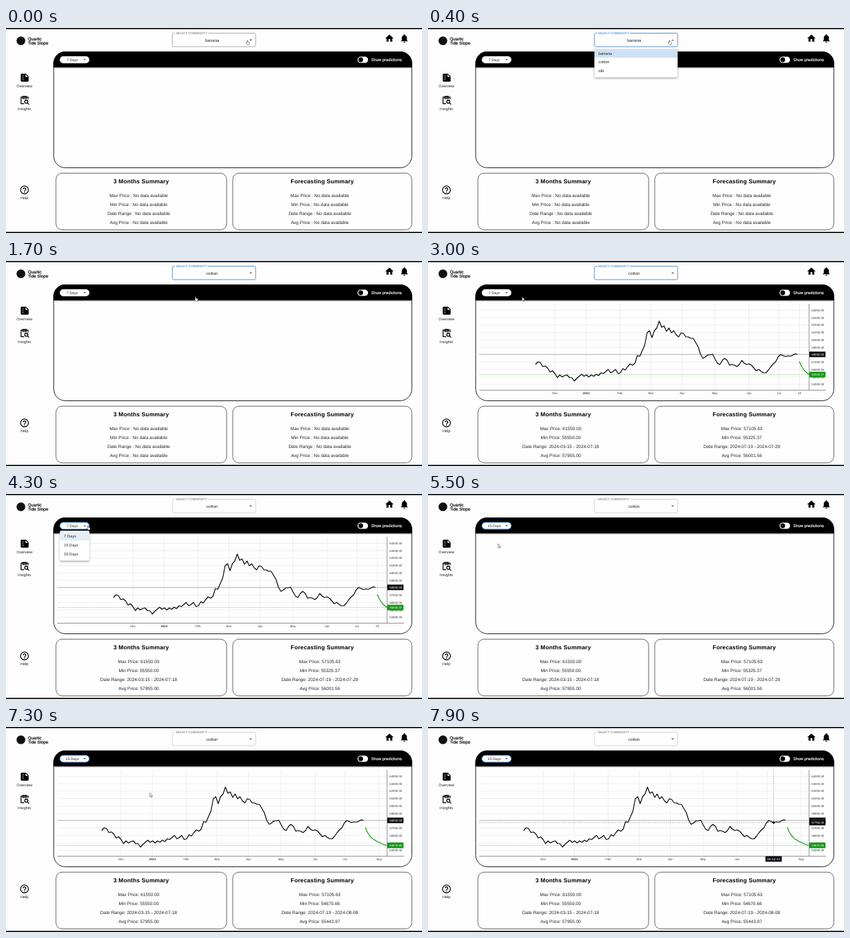
These frames come from a looping animation (600x297 px, 8 s). An HTML page:

```html
<!DOCTYPE html>
<html lang="en">
<head>
<meta charset="utf-8">
<title>Price dashboard</title>
<style>
html, body { margin: 0; width: 100%; height: 100%; overflow: hidden; background: #fefdfe; }
svg { display: block; width: 600px; height: 297px; }
text { font-family: "Liberation Sans", Arial, sans-serif; text-rendering: geometricPrecision; white-space: pre; }
</style>
</head>
<body>
<svg id="stage" viewBox="0 0 600 297" xmlns="http://www.w3.org/2000/svg">
  <defs>
    <linearGradient id="shade" x1="0" y1="0" x2="0" y2="1">
      <stop offset="0" stop-color="#000" stop-opacity=".4"/>
      <stop offset="1" stop-color="#000" stop-opacity="0"/>
    </linearGradient>
    <filter id="drop" x="-20%" y="-20%" width="140%" height="150%">
      <feDropShadow dx="0" dy="1.5" stdDeviation="1.6" flood-color="#000" flood-opacity=".4"/>
    </filter>
  </defs>
</svg>
<script>
const LOOP = 8000;
const stage = document.getElementById('stage');

function el(tag, attrs = {}, parent = stage, text) {
  const node = document.createElementNS('http://www.w3.org/2000/svg', tag);
  set(node, attrs);
  if (text !== undefined) node.textContent = text;
  parent.appendChild(node);
  return node;
}
function set(node, attrs) {
  for (const k in attrs) node.setAttribute(k, attrs[k]);
}
const group = (parent = stage, attrs = {}) => el('g', attrs, parent);
// y is the middle of the capitals
const label = (text, x, y, size, attrs = {}, parent = stage) =>
  el('text', { x, y: y + size * 0.36, 'font-size': size, fill: '#222', ...attrs }, parent, text);
const box = (x, y, width, height, attrs = {}, parent = stage) =>
  el('rect', { x, y, width, height, ...attrs }, parent);
const line = (x1, y1, x2, y2, stroke, attrs = {}, parent = stage) =>
  el('line', { x1, y1, x2, y2, stroke, 'stroke-width': 0.7, ...attrs }, parent);
const path = (d, attrs = {}, parent = stage) => el('path', { d, ...attrs }, parent);
const show = (node, on) => node.setAttribute('visibility', on ? 'visible' : 'hidden');
const MID = { 'text-anchor': 'middle' };

// Page frame and brand
box(0, 0, 600, 1.6);
box(0, 295.4, 600, 1.6);
el('circle', { cx: 21.5, cy: 18.5, r: 6.3, fill: '#111' });
const brand = { fill: '#111', stroke: '#111', 'stroke-width': 0.2 };
label('Quartic', 31.5, 15.3, 6.2, brand);
label('Tide Slope', 31.5, 21.9, 6.2, brand);

// Icons on a 24 unit grid
const icon = (x, y, s) => group(stage, { transform: `translate(${x} ${y}) scale(${s})` });
path('M10 20v-6h4v6h5v-8h3L12 3 2 12h3v8z', {}, icon(545.8, 7.7, 0.6));
path('M12 22c1.1 0 2-.9 2-2h-4c0 1.1.9 2 2 2zm6-6v-5c0-3.1-1.6-5.6-4.5-6.3V4a1.5 1.5 0 0 0-3 0v.7C7.6 5.4 6 7.9 6 11v5l-2 2v1h16v-1z',
  {}, icon(567.1, 7.5, 0.62));
const doc = icon(19.4, 64.4, 0.63);
path('M15 3H5a2 2 0 0 0-2 2v14a2 2 0 0 0 2 2h14a2 2 0 0 0 2-2V9z', {}, doc);
path('M14 4.5V10h5.5z', { fill: '#fff' }, doc);
[8, 12, 16].forEach(cy => el('circle', { cx: 8, cy, r: 1, fill: '#fff' }, doc));
const clip = icon(19.2, 97, 0.63);
path('M11 20H4V5h16v5M8 3.5h8V8H8z', { fill: 'none', stroke: '#000', 'stroke-width': 2 }, clip);
el('circle', { cx: 16, cy: 15.5, r: 3.6, fill: 'none', stroke: '#000', 'stroke-width': 2 }, clip);
path('M18.5 18l4 4', { stroke: '#000', 'stroke-width': 2 }, clip);
const help = icon(19.1, 227.1, 0.63);
el('circle', { cx: 12, cy: 12, r: 9, fill: 'none', stroke: '#000', 'stroke-width': 2 }, help);
path('M11 18h2v-2h-2zM12 6a4 4 0 0 0-4 4h2a2 2 0 0 1 4 0c0 2-3 1.75-3 5h2c0-2.25 3-2.5 3-5a4 4 0 0 0-4-4z', {}, help);
[['Overview', 84.2], ['Insights', 116.8], ['Help', 246.2]].forEach(([s, y]) => label(s, 26.6, y, 5.5, MID));

// Commodity select
const field = box(240, 7.5, 120, 19.5, { rx: 1.5, fill: 'none' });
box(243.5, 5.5, 48, 4, { fill: '#fefdfe' });
const fieldName = label('SELECT COMMODITY', 245, 7.3, 4.35);
const fieldValue = label('', 297.3, 17.5, 6, MID);
const fieldArrow = path('M-2-1h4L0 1.1z', { fill: '#666' });

// Chart card
box(68.8, 34.5, 516.5, 168, { rx: 17, fill: '#fefefe', stroke: '#222', 'stroke-width': 1 });
path('M68.4 57V51a17 17 0 0 1 17-17H568.7a17 17 0 0 1 17 17V57z');
box(69.3, 57, 515.6, 2.2, { fill: 'url(#shade)' });
const pill = box(77.7, 41, 42.4, 10, { rx: 5, fill: '#fff' });
const pillValue = label('', 95.6, 46, 5.2, MID);
const pillArrow = path('M-1.8-.9h3.6L0 1z', { fill: '#555' });
box(507, 41.5, 15.2, 9, { rx: 4.5, fill: '#fff' });
el('circle', { cx: 511.6, cy: 46, r: 3.4 });
label('Show predictions', 526.7, 46, 5.8, { fill: '#fff', stroke: '#fff', 'stroke-width': 0.15 });

// Chart
const yOf = p => 178.7 - (p - 54000) * 0.01072;
const priceAt = y => Math.round((54000 + (178.7 - y) / 0.01072) / 50) * 50;
const STEP = 3.5, X0 = 155;
const series = [150,146,147,153,152,155,161,159,163,169,165,168,166,165,169,169,174,170,167,164,
  167,165,168,165,167,164,166,162,163,160,157,162,160,157,163,162,156,158,153,149,
  151,148,137,138,130,122,104,101,111,101,97,87,96,94,102,97,104,101,107,110,
  104,105,110,110,112,112,118,124,135,141,139,136,136,135,142,148,150,144,141,144,
  151,150,151,153,150,144,148,150,149,151,155,159,157,160,162,162,158,153,149,146,
  139,135.5,137,138.5,137.5,138,136.5,134.5,135.3];
const curve = 'M' + series.map((y, i) => `${X0 + i * STEP} ${y}`).join('L');
const months = [['Dec', 183], ['2024', 228], ['Feb', 277], ['Mar', 321.5], ['Apr', 366.7],
  ['May', 413.7], ['Jun', 463], ['Jul', 506]];

function tag(parent, y, text, fill) {
  const g = group(parent, { transform: `translate(0 ${y})` });
  box(550, -4, 23.3, 8, { fill }, g);
  g.value = label(text, 553.3, 0, 4.3, { fill: '#fff' }, g);
  return g;
}

function makeChart(shift, tail, forecast, last) {
  const g = group();
  for (let p = 54000; p <= 64000; p += 1000) {
    line(74, yOf(p), 549.5, yOf(p), '#e9e9ec', {}, g);
    if (p !== 58000) label(`${p}.00`, 553.3, yOf(p), 4.3, { fill: '#333' }, g);
  }
  [...months.map(([s, x]) => [s, x + shift]), tail].forEach(([s, x]) => {
    line(x, 62, x, 187, '#e9e9ec', {}, g);
    label(s, x, 191.5, 4.3, { ...MID, fill: '#333', 'font-weight': s === '2024' ? 700 : 400 }, g);
  });
  line(74, yOf(58050), 549.5, yOf(58050), '#999', {}, g);
  line(74, yOf(last), 549.5, yOf(last), '#2a9d2a', { 'stroke-dasharray': '.7 .9', 'stroke-width': 0.6 }, g);
  line(549.7, 62, 549.7, 187, '#666', {}, g);
  line(74, 187.2, 574, 187.2, '#555', {}, g);
  const stroke = { fill: 'none', 'stroke-width': 1.15, 'stroke-linejoin': 'round' };
  path(curve, { ...stroke, stroke: '#000', transform: `translate(${shift} 0)` }, g);
  path(forecast, { ...stroke, stroke: '#129612' }, g);
  tag(g, yOf(58050), '58050.00', '#0b0d12');
  tag(g, yOf(last), last.toFixed(2), '#129612');
  return g;
}
const weekChart = makeChart(0, ['19', 535.5], 'M535.5 145.5L538 151 540 154.5 543 159 546 161.5 549.5 164.5', 55325.37);
const longChart = makeChart(-17, ['Aug', 538],
  'M518.5 145.5L521 152 524 157 527 160 529 162.5 532 163.5 535 166 538 166.8 541 168.8 545 170.2 549.5 171.5', 54670.66);

// Crosshair
const cross = group(longChart);
const dash = { 'stroke-dasharray': '1.8 1.4', 'stroke-width': 0.6 };
const crossV = line(0, 62, 0, 187, '#888', dash, cross);
const crossH = line(74, 0, 549.5, 0, '#888', dash, cross);
const dot = el('circle', { r: 1.7 }, cross);
const crossTag = tag(cross, 0, '', '#0b0d12');
const dateTag = group(cross);
box(-11.8, 187.2, 23.6, 8, { fill: '#0b0d12' }, dateTag);
const dateText = label('', 0, 191.3, 4.4, { ...MID, fill: '#fff' }, dateTag);

function moveCross(x) {
  const i = Math.round((x + 17 - X0) / STEP);
  const cx = X0 + i * STEP - 17, cy = series[i];
  set(crossV, { x1: cx, x2: cx });
  set(crossH, { y1: cy, y2: cy });
  set(dot, { cx, cy });
  set(crossTag, { transform: `translate(0 ${cy})` });
  crossTag.value.textContent = priceAt(cy).toFixed(2);
  set(dateTag, { transform: `translate(${cx} 0)` });
  const d = new Date(Date.UTC(2024, 6, 8 + Math.round((cx - 498.5) / 1.52)));
  const mon = ['Jan','Feb','Mar','Apr','May','Jun','Jul','Aug','Sep','Oct','Nov','Dec'][d.getUTCMonth()];
  dateText.textContent = `${String(d.getUTCDate()).padStart(2, '0')} ${mon} '${d.getUTCFullYear() % 100}`;
}

// Summary cards
const ROWS = ['Max Price', 'Min Price', 'Date Range', 'Avg Price'];
function makeCard(x, w, title, tx) {
  box(x, 210.3, w, 82.2, { rx: 9, fill: '#fefefe', stroke: '#444', 'stroke-width': 0.8 });
  label(title, tx, 222.3, 8.4, { ...MID, fill: '#000', 'font-weight': 700, 'letter-spacing': 0.17 });
  return ROWS.map((_, i) => label('', tx - 3.6, 242.4 + i * 13.05, 6.5, MID));
}
const fill = (rows, data) => rows.forEach((r, i) => {
  r.textContent = data ? `${ROWS[i]}: ${data[i]}` : `${ROWS[i]} : No data available`;
});
const past = makeCard(72, 246.2, '3 Months Summary', 195);
const ahead = makeCard(327, 258.3, 'Forecasting Summary', 456.2);
const PAST = ['61550.00', '55550.00', '2024-03-15 - 2024-07-18', '57955.00'];
const AHEAD_WEEK = ['57105.63', '55325.37', '2024-07-19 - 2024-07-29', '56001.56'];
const AHEAD_LONG = ['57105.63', '54670.66', '2024-07-19 - 2024-08-08', '55443.97'];

// Drop-down menus
function makeMenu(x, y, w, h, top, textX, size, items) {
  const g = group();
  box(x, y, w, h, { rx: 1.5, fill: '#fff', filter: 'url(#drop)' }, g);
  const rows = items.map((s, i) => {
    const bg = box(x, top + i * 12.8, w, 12.8, {}, g);
    label(s, textX, top + 6.4 + i * 12.8, size, {}, g);
    return bg;
  });
  return { g, rows, top };
}
function drawMenu(menu, opacity, py, picked) {
  set(menu.g, { opacity });
  show(menu.g, opacity > 0);
  const over = Math.floor((py - menu.top) / 12.8);
  menu.rows.forEach((r, i) => set(r, { fill: i === 0 ? picked : i === over ? '#f2f2f3' : '#fff' }));
}
const goods = makeMenu(240, 29.8, 120, 41.4, 30.2, 245.8, 5.8, ['banana', 'cotton', 'silk']);
const spans = makeMenu(77.8, 53.2, 42.4, 43, 54.8, 83.6, 5.6, ['7 Days', '15 Days', '30 Days']);

// Pointer
const look = { fill: '#fff', stroke: '#333', 'stroke-width': 0.5, 'stroke-linejoin': 'round' };
const arrow = path('M0 0V5.6L1.3 4.5 2.2 6.5 3.1 6.1 2.3 4.2H4z', look);
const hand = path('M1 .7Q1.6-.2 2.1.7V2.6L4.4 3.2Q5 3.4 4.9 4.2L4.3 6.6H1.9L0 4.3Q-.1 3.5 1 4z', look);
const keys = [[0, 346.5, 17.5], [500, 346.5, 17.5], [1000, 292, 45], [1400, 272, 51.5], [1700, 272, 51.5],
  [2100, 168, 67], [2200, 168, 67], [2400, 145.5, 60], [2700, 145.5, 60], [3000, 135.8, 52],
  [3600, 115.5, 46.8], [3700, 116.2, 46.5], [4100, 116.2, 46.5], [4300, 116.5, 45.5], [4900, 101, 72],
  [6100, 101, 72], [6400, 207.5, 95.5], [7400, 207.5, 95.5], [7900, 499, 138]];

function pointer(t) {
  let i = keys.findIndex(k => k[0] > t);
  if (i < 0) return keys[keys.length - 1].slice(1);
  const [ta, xa, ya] = keys[i - 1], [tb, xb, yb] = keys[i];
  const u = (t - ta) / (tb - ta), e = (u + u * u * (3 - 2 * u)) / 2;
  return [xa + (xb - xa) * e, ya + (yb - ya) * e];
}

// Opens over about 200 ms, closes a little faster
function fade(t, open, close) {
  if (t < open || t >= close + 200) return 0;
  if (t >= close) return [0.55, 0.15][Math.floor((t - close) / 100)];
  return Math.min(1, 0.4 + (t - open) / 250);
}

function draw(now) {
  const t = Math.floor((now % LOOP) / 100) * 100; // screen refreshes ten times a second
  const [x, y] = pointer(t);

  const focus = t >= 200 && t < 4100;
  set(field, { stroke: focus ? '#5c93c8' : t < 200 ? '#999' : '#c9c9c9', 'stroke-width': focus ? 1 : 0.8 });
  set(fieldName, { fill: focus ? '#1976c8' : '#666' });
  fieldValue.textContent = t < 1500 ? 'banana' : 'cotton';
  const up = t >= 200 && t < 1500;
  set(fieldArrow, { transform: `translate(353 17.6) scale(1 ${up ? -1 : 1})` });
  drawMenu(goods, fade(t, 200, 1500), y, '#cfe1f4');

  set(pill, { stroke: t >= 4100 ? '#2f80cf' : '#ccc', 'stroke-width': t >= 4100 ? 1 : 0.4 });
  pillValue.textContent = t < 5000 ? '7 Days' : '15 Days';
  const spanUp = t >= 4100 && t < 5000;
  set(pillArrow, { transform: `translate(113.5 46) scale(1 ${spanUp ? -1 : 1})` });
  drawMenu(spans, fade(t, 4100, 5000), y, '#e6edf4');

  show(weekChart, t >= 2800 && t < 5500);
  set(longChart, { display: t >= 7100 ? 'inline' : 'none' });
  const tracking = t >= 7500;
  show(cross, tracking);
  if (tracking) moveCross(x);
  fill(past, t >= 2800 && PAST);
  fill(ahead, t >= 7100 ? AHEAD_LONG : t >= 2800 && AHEAD_WEEK);

  const pointing = t <= 1700 || (t >= 3600 && t <= 5000);
  show(hand, pointing);
  show(arrow, !pointing && !tracking);
  set(pointing ? hand : arrow, { transform: `translate(${x} ${y})` });
}

const start = performance.now();
function tick() {
  draw(performance.now() - start);
  requestAnimationFrame(tick);
}
tick();
</script>
</body>
</html>
```
